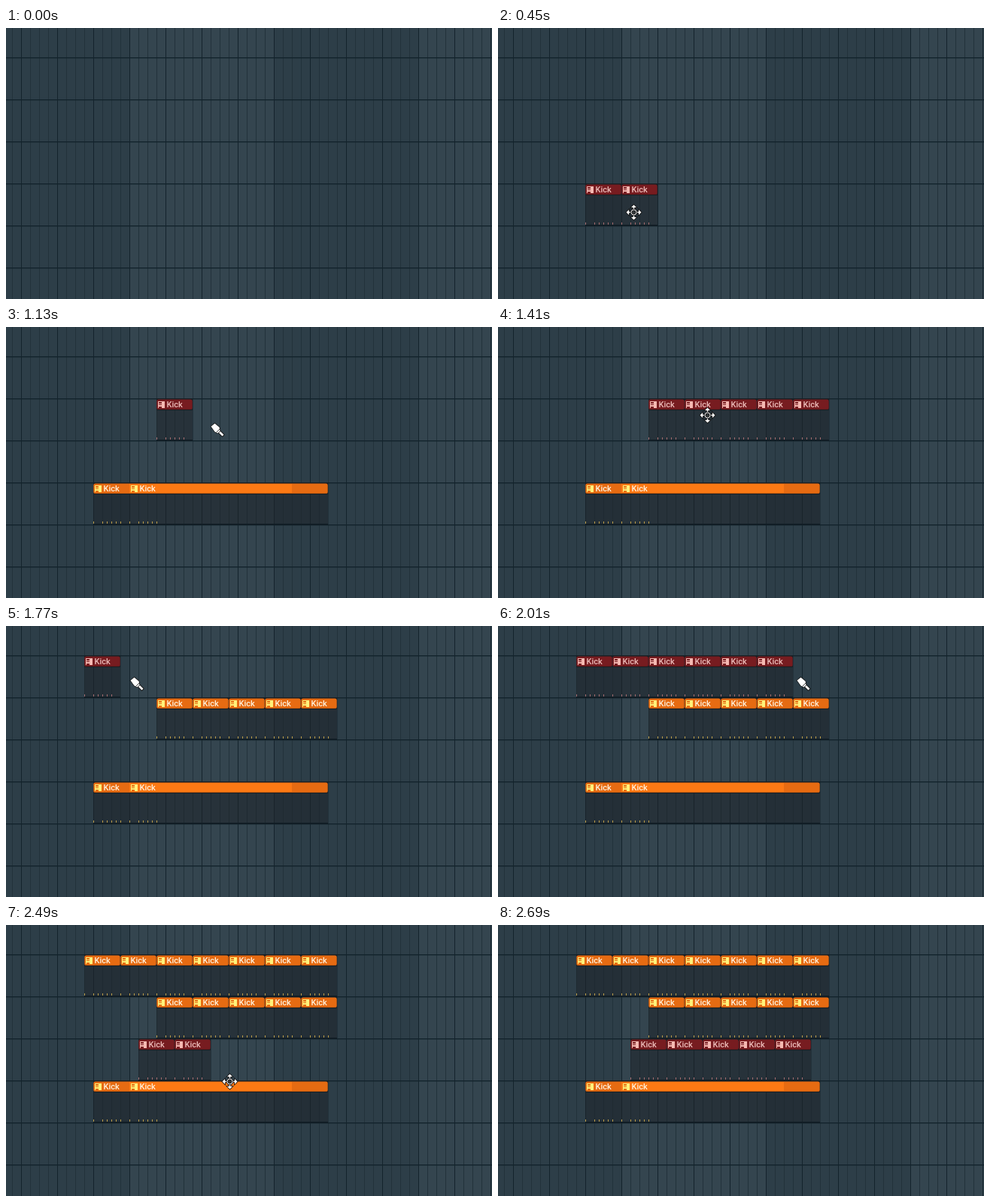
Animation, 646 px wide and 361 px high, one loop 3.14 s. Source, as an HTML page with a canvas:

```html
<!DOCTYPE html>
<html lang="en">
<head>
<meta charset="utf-8">
<title>Painting clips</title>
<style>
html, body { margin: 0; width: 100%; height: 100%; overflow: hidden; background: #2d3e48; }
canvas { display: block; }
</style>
</head>
<body>
<canvas width="646" height="361"></canvas>
<script>
const ctx = document.querySelector('canvas').getContext('2d');
const LOOP = 3140, FIRST = 290, STEP = 40, LAST = 2690;
const CLIP = 48, CELL = 12, ROW = 56;

// Each row is painted by dragging from grab to release
const rows = [
  { x: 116, y: 207, start: 290, end: 810, grab: [136, 244], release: [396, 250], stretch: true },
  { x: 200, y: 95, start: 1050, end: 1210, grab: [214, 130], release: [400, 148] },
  { x: 104, y: 39, start: 1650, end: 2010, grab: [118, 76], release: [405, 76] },
  { x: 176, y: 151, start: 2330, end: 2570, grab: [186, 182], release: [390, 230] }
];
const exit = { start: 2650, grab: [400, 281] };

const red = { head: '#771c20', bright: '#861f21', text: '#ecbcb9', icon: '#f5b9b2', tick: '#a06a6c' };
const orange = { head: '#e66b12', bright: '#fc7914', text: '#fff1dc', icon: '#fff27a', tick: '#b89a48' };

const clamp = k => Math.max(0, Math.min(1, k));
const mix = (a, b, k) => a.map((v, i) => v + (b[i] - v) * k);
const smooth = k => k * k * (3 - 2 * k);

function sweep(row, t) {
  const k = clamp((t - row.start) / (row.end - row.start));
  return mix(row.grab, row.release, k ** 1.5);
}

function pointer(t) {
  const i = rows.findLastIndex(row => t >= row.start);
  const row = rows[i], next = rows[i + 1] || exit;
  if (t <= row.end) return sweep(row, t);
  return mix(row.release, next.grab, smooth(clamp((t - row.end) / (next.start - row.end))));
}

function rect(x, y, w, h, color) {
  ctx.fillStyle = color;
  ctx.fillRect(x, y, w, h);
}

function shape(points, width) {
  ctx.beginPath();
  points.forEach(([x, y]) => ctx.lineTo(x, y));
  ctx.closePath();
  ctx.lineWidth = width;
  ctx.strokeStyle = '#111';
  ctx.fillStyle = '#fff';
  ctx.stroke();
  ctx.fill();
}

function drawGrid() {
  for (let x = -27; x < 646; x += 384) {
    rect(x, 0, 192, 361, '#2d3e48');
    rect(x + 192, 0, 192, 361, '#34454f');
  }
  for (let x = 8; x < 646; x += CELL) {
    rect(x, 0, 1, 361, x % CLIP === 20 ? '#14232c' : '#22323b');
  }
  for (let y = 39; y < 361; y += ROW) {
    rect(0, y, 646, 1, '#13232c');
    rect(0, y + 1, 646, 1, 'rgba(19,35,44,.4)');
  }
}

function drawHeader(x, y, w, color) {
  rect(x, y, w, 16, '#1a2025');
  ctx.fillStyle = color;
  ctx.beginPath();
  ctx.roundRect(x + .3, y + 1.5, w - .6, 13.5, 2.5);
  ctx.fill();
  rect(x + 2, y + 14, w - 4, 1, 'rgba(0,0,0,.15)');
}

function drawLabel(x, y, c) {
  rect(x + 2, y + 4, 9, 9, c.icon);
  for (let dy = 5; dy < 12; dy += 3) rect(x + 3, y + dy, 4, dy === 8 ? 1 : 2, c.head);
  ctx.fillStyle = c.text;
  ctx.font = '500 11px Roboto, sans-serif';
  ctx.fillText('Kick', x + 13.5, y + 12);
  for (let dx = 0; dx <= 36; dx += 6) {
    if (dx !== 6) rect(x + dx, y + 52, 1, 3, c.tick);
  }
}

function drawRow(row, t, c) {
  const { x, y, stretch } = row;
  const reach = sweep(row, t - STEP)[0] - x;
  const painted = Math.floor(reach / CLIP) + 1;
  const count = stretch ? Math.min(2, painted) : painted;
  const extra = stretch ? Math.max(0, Math.floor((reach - 64) / CELL) * CELL) : 0;
  row.width = count * CLIP + extra;

  rect(x, y + 16, row.width, 40, 'rgba(29,36,41,.56)');
  rect(x, y + 55, row.width, 2, '#111d25');
  if (extra) {
    drawHeader(x, y, row.width, c.head);
    rect(x + CLIP, y + 2, row.width - 2 * CLIP, 12, c.bright);
  }
  for (let i = 0; i < count; i++) {
    if (!extra) drawHeader(x + i * CLIP, y, CLIP, c.head);
    drawLabel(x + i * CLIP, y, c);
  }
}

function drawMove() {
  for (let i = 0; i < 4; i++) {
    shape([[0, -10], [3.5, -6.5], [.8, -6.5], [.8, -2], [-.8, -2], [-.8, -6.5], [-3.5, -6.5]], 1.6);
    ctx.rotate(Math.PI / 2);
  }
  ctx.beginPath();
  ctx.arc(0, 0, 3.5, 0, 7);
  ctx.fillStyle = '#34383a';
  ctx.fill();
  for (const [color, width] of [['#111', 2.6], ['#fff', 1]]) {
    ctx.strokeStyle = color;
    ctx.lineWidth = width;
    ctx.stroke();
  }
}

function drawBrush() {
  shape([[2, 4], [4, 2], [9, 7], [7, 9]], 1.8);
  shape([[-8, -4], [-3, -8], [3, -3], [4, 2], [1, 5], [-3, 3]], 1.4);
  ctx.beginPath();
  ctx.moveTo(-1, 4);
  ctx.lineTo(4, -1);
  ctx.lineWidth = .8;
  ctx.stroke();
}

function drawPointer(t, active) {
  const [x, y] = pointer(t).map(Math.round);
  const overClip = active.some(r => x >= r.x && x < r.x + r.width && y >= r.y && y < r.y + ROW);
  ctx.save();
  ctx.translate(x + .5, y + .5);
  (overClip ? drawMove : drawBrush)();
  ctx.restore();
}

function frame() {
  const now = performance.now() % LOOP;
  drawGrid();
  if (now >= FIRST) {
    const t = Math.min(LAST, FIRST + Math.floor((now - FIRST) / STEP) * STEP);
    const active = rows.filter(row => t > row.start + STEP);
    active.forEach((row, i) => drawRow(row, t, i < active.length - 1 ? orange : red));
    if (t < LAST) drawPointer(t, active);
  }
  requestAnimationFrame(frame);
}
frame();
</script>
</body>
</html>
```
